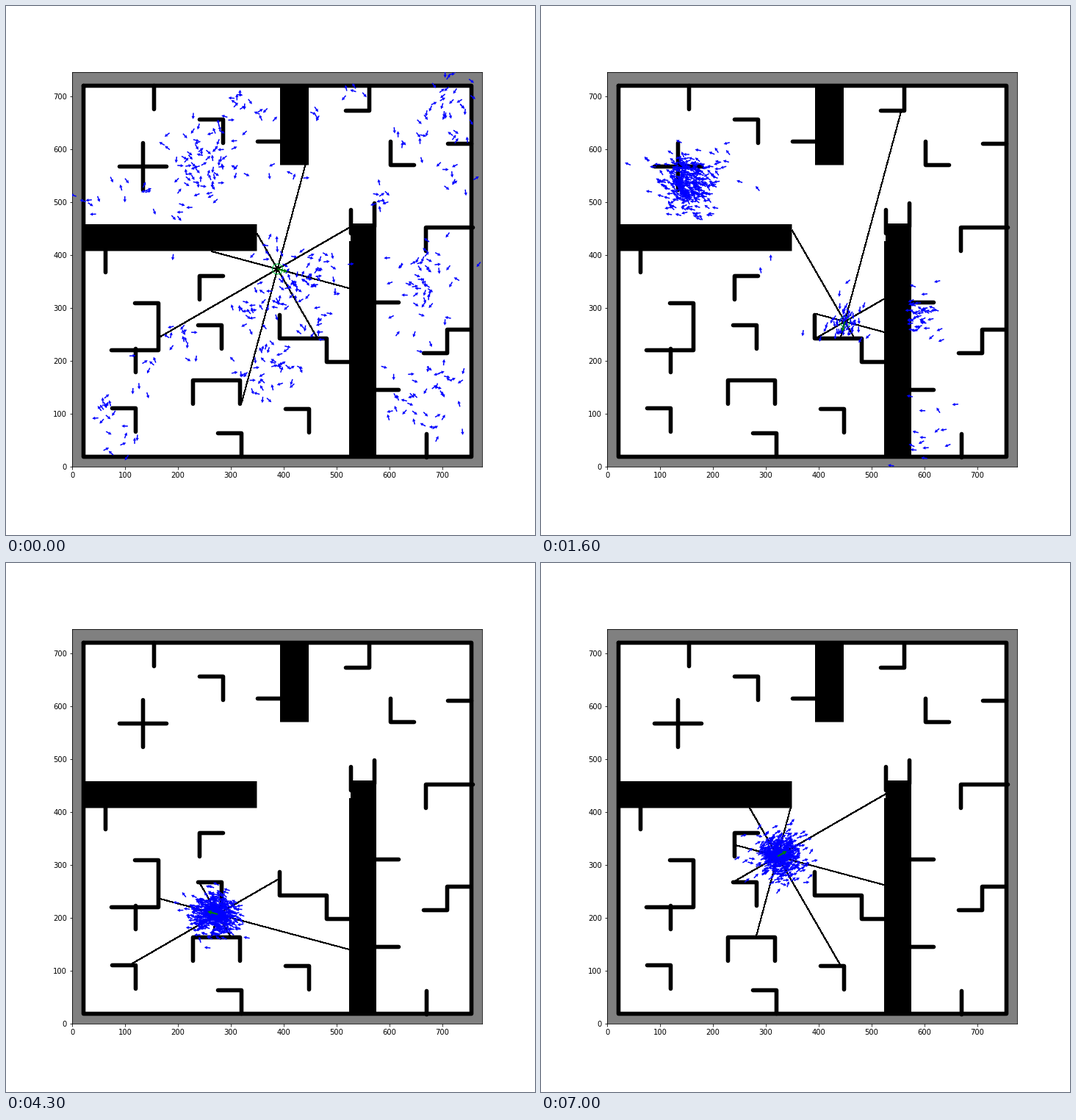
Write a matplotlib script that moves like this. It is 720 px wide and 720 px high and loops after 7100 ms.

```python
import numpy as np
import matplotlib.pyplot as plt
from matplotlib.animation import FuncAnimation
from matplotlib.patches import Circle, Rectangle

SIZE, FRAMES = 720, 71
LEFT, RIGHT, TOP, BOTTOM = 90, 648, 90, 627
WALL, ARM = 5.6, 32
SETTLE = 9              # frames until the scatter has become a few clouds
TOTAL, SEED = 440, 30   # all particles; size of each cloud at the start
rng = np.random.default_rng(4)

# Map in stage pixels. Blocks: x, y, width, height.
BLOCKS = [(373, 106, 39, 110.5), (105, 297, 236.5, 36.5), (467, 320, 37, 294),
          (469, 296, 35, 30)]
# Thin walls: a start and compass moves of one arm each.
WALLS = [
    (201, 108, "S"), (342, 184, "E"), (601, 187, "E"), (186, 186, "SS"),
    (154, 218, "EE"), (135, 330, "S"), (469, 277, "S"), (501, 268, "S"),
    (502, 403, "E"), (502, 522, "E"), (572, 582, "S"), (176, 466, "S"),
    (263, 154, "ES"), (462, 142, "EN"), (523, 184, "SE"), (571, 333, "NEE"),
    (568, 472, "ENE"), (263, 399, "NE"), (175, 404, "ESSWW"),
    (261, 434, "ES"), (372, 420, "SEESE"), (254, 541, "NEES"),
    (144, 547, "ES"), (288, 581, "ES"), (380, 548, "ES"),
]
COMPASS = {"N": (0, -1), "E": (1, 0), "S": (0, 1), "W": (-1, 0)}

# Robot legs: first frame, last frame, heading, length
START = np.array([369.5, 358])
LEGS = [(0, 8, -15, 61), (8, 27, -105, 137), (28, 53, -195, 181),
        (53, 70, -330, 120)]

# Rival clouds: x and y once settled, turn from the robot, spread, count, end
RIVALS = [(250, 255, -90, 14, 320, 33), (317, 387, 195, 12, 42, 17),
          (567, 425, -75, 12, 60, 23), (566, 563, -75, 18, 45, 19),
          (323, 231, 15, 11, 14, 13), (597, 180, -75, 11, 9, 12)]


def ease(t):
    t = np.clip(t, 0, 1)
    return t * t * (3 - 2 * t)


def direction(deg):
    a = np.radians(deg)
    return np.stack([np.cos(a), -np.sin(a)], axis=-1)


def rotate(v, deg):
    return v[0] * direction(deg) + v[1] * direction(deg - 90)


def robot(i):
    pos = START.copy()
    for first, last, angle, length in LEGS:
        pos += length * np.clip((i - first) / (last - first), 0, 1) * direction(angle)
        if i >= first:
            heading = angle
    return pos, heading


def wall_line(x, y, moves):
    steps = [(x + 0.5, y + 0.5)] + [np.multiply(COMPASS[m], ARM) for m in moves]
    return np.cumsum(steps, axis=0)


ROOM = np.array([(105, 108), (633, 108), (633, 613), (105, 613), (105, 108)]) + 0.5
LINES = [wall_line(*w) for w in WALLS] + [ROOM]


def build_grids():
    solid = np.zeros((SIZE, SIZE), bool)

    def fill(grid, x0, y0, x1, y1):
        grid[round(y0):round(y1), round(x0):round(x1)] = True

    for x, y, w, h in BLOCKS:
        fill(solid, x, y, x + w, y + h)
    grid = solid.copy()
    for line in LINES:
        for a, b in zip(line, line[1:]):
            fill(grid, *(np.minimum(a, b) - WALL / 2), *(np.maximum(a, b) + WALL / 2))
    return grid, solid


def lookup(grid, pos):
    x, y = np.clip(pos.astype(int), 0, SIZE - 1).T
    return grid[y, x]


GRID, SOLID = build_grids()


def cast(pos, deg):
    path = pos + np.arange(0, 700, 0.5)[:, None] * direction(deg)
    return path[np.argmax(lookup(GRID, path))]


class Cloud:
    """Swarm that repeats the robot's moves from its own pose."""

    def __init__(self, x, y, turn, spread, count, end=None):
        self.anchor, self.turn, self.spread = np.array([x, y]), turn, spread
        self.count, self.end = count, end
        tail = np.sqrt(8 / rng.chisquare(8, max(count, SEED)))[:, None]
        o = rng.normal(size=(len(tail), 3))
        self.noise = []
        for _ in range(FRAMES):
            self.noise.append(np.c_[o[:, :2] * tail, o[:, 2]])
            o = 0.85 * o + 0.527 * rng.normal(size=o.shape)

    def size(self, i):
        hold = SETTLE + 0.3 * (self.end - SETTLE)
        grown = SEED + (self.count - SEED) * ease(i / SETTLE)
        return round(grown * (1 - ease((i - hold) / (self.end - hold))))

    def at(self, i, n, lead=0, growth=0.04):
        o = self.noise[i][:n]
        pos, heading = robot(i)
        loose = 1 - ease(i / SETTLE)
        center = self.anchor + rotate(pos - robot(SETTLE)[0], self.turn)
        center = center + lead * loose * direction(heading)
        spread = self.spread * (1 + 0.8 * loose + growth * max(0, i - SETTLE))
        angle = heading + self.turn + (22 + 50 * loose) * o[:, 2]
        return center + spread * o[:, :2], angle


class Strays:
    """Scattered clumps whose particles move ahead and soon die out."""

    def __init__(self, clumps=36, each=7):
        centers = rng.uniform((115, 118), (625, 603), (clumps, 2))
        sizes = rng.poisson(each, clumps)
        self.pos = np.repeat(centers, sizes, axis=0)
        n = len(self.pos)
        self.pos += rng.normal(0, 13, (n, 2))
        self.angle = rng.uniform(0, 360, n)
        self.life = rng.integers(1, 8, n)

    def at(self, i):
        on = self.life > i
        angle = self.angle[on]
        return self.pos[on] + 7.2 * i * direction(angle), angle


rivals = [Cloud(*r) for r in RIVALS]
tracker = Cloud(*robot(SETTLE)[0], 0, 12.5, TOTAL)
strays = Strays()


def particles(i):
    sizes = [c.size(i) for c in rivals]
    sets = [c.at(i, n) for c, n in zip(rivals, sizes)] + [strays.at(i)]
    rest = TOTAL - sum(len(p) for p, _ in sets)
    sets.append(tracker.at(i, max(rest, 34), lead=40, growth=0))
    pos = np.vstack([p for p, _ in sets])
    angle = np.concatenate([a for _, a in sets])
    free = ~lookup(SOLID, pos)
    return pos[free], angle[free]


fig = plt.figure(figsize=(10, 10), dpi=72, facecolor="white")
ax = fig.add_axes([LEFT / SIZE, 1 - BOTTOM / SIZE,
                   (RIGHT - LEFT) / SIZE, (BOTTOM - TOP) / SIZE])
ax.set(xlim=(LEFT, RIGHT), ylim=(BOTTOM, TOP), facecolor="#808080")
marks = range(8)
labels = [str(100 * k) for k in marks]
ax.set_xticks([LEFT + 72 * k for k in marks], labels)
ax.set_yticks([BOTTOM - 72 * k for k in marks], labels)

ax.add_patch(Rectangle(ROOM[0], *(ROOM[2] - ROOM[0]), color="white", lw=0, zorder=1))
for x, y, w, h in BLOCKS:
    ax.add_patch(Rectangle((x, y), w, h, color="black", lw=0, snap=False, zorder=1.5))
for line in LINES:
    ax.plot(*line.T, color="black", lw=WALL, snap=False, zorder=1.5,
            solid_capstyle="round", solid_joinstyle="round")

rays = [ax.plot([], [], color="black", lw=1, antialiased=False, zorder=2)[0]
        for _ in range(8)]
ring = ax.add_patch(Circle((0, 0), 7, fill=False, ec="#14c850", lw=1.1, zorder=2.5))
arrows = []


def add_arrows(pos, angle, length, color, width, z):
    d = direction(angle) * length
    arrows.append(ax.quiver(*pos.T, *d.T, color=color, angles="xy",
                            scale_units="xy", scale=1, units="dots",
                            width=width, headwidth=3, headlength=2.8,
                            headaxislength=2.6, zorder=z))


def draw(i):
    while arrows:
        arrows.pop().remove()
    pos, heading = robot(i)
    for k, ray in enumerate(rays):
        ray.set_data(*zip(pos, cast(pos, heading + 45 * k)))
    ring.center = pos
    add_arrows(*particles(i), 8.5, "blue", 1.5, 3)
    add_arrows(pos[None], np.array([heading]), 14.4, "green", 2, 4)
    return arrows


anim = FuncAnimation(fig, draw, frames=FRAMES, interval=100, repeat=True,
                     repeat_delay=0, init_func=lambda: draw(0), blit=False)
plt.show()
```
